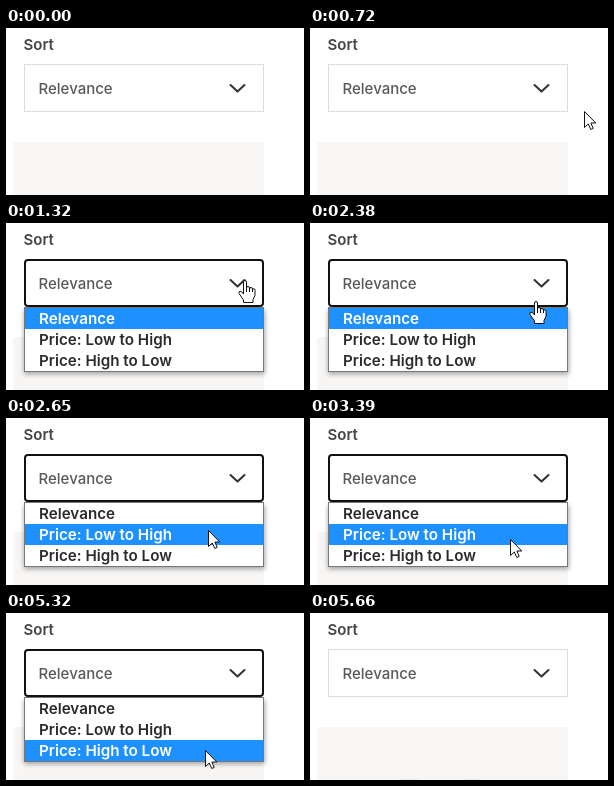
An HTML page that plays this animation: 298x167 px, repeating every 5790 ms.

```html
<!DOCTYPE html>
<html lang="en">
<head>
<meta charset="utf-8">
<title>Sort menu</title>
<style>
  html, body { margin: 0; width: 100%; height: 100%; overflow: hidden; background: #fff; }
  svg { display: block; width: 100vw; height: 100vh; }
  text { font: 500 15px Inter, Roboto, sans-serif; fill: #595959; }
  .label { font-weight: 600; fill: #444; }
  #list text { font-weight: 600; font-size: 15.2px; fill: #2a2a2a; }
  #list .on text { fill: #fff; }
  #list rect.row { fill: none; }
  #list .on rect.row { fill: #1e90ff; }
  .cursor { fill: #fff; stroke: #111; stroke-linejoin: round; }
</style>
</head>
<body>
<svg viewBox="0 0 298 167">
  <defs>
    <filter id="soft" x="-10%" y="-20%" width="120%" height="150%">
      <feGaussianBlur stdDeviation="2.5"/>
    </filter>
  </defs>
  <path d="M7 167V117q0-3 3-3H258V167Z" fill="#f7f6f5"/>
  <path id="hint" d="M92 166.5h18M152 166.5h20" stroke="#e9e9e8"/>
  <text class="label" x="17.5" y="22">Sort</text>
  <rect id="box" fill="#fff"/>
  <text x="32.5" y="66">Relevance</text>
  <path d="M224.5 57l7 6.5 7-6.5" fill="none" stroke="#333" stroke-width="2.1" stroke-linecap="round" stroke-linejoin="round"/>
  <g id="list">
    <rect x="18" y="87" width="241" height="64" fill="#000" opacity=".35" filter="url(#soft)"/>
    <rect x="18.5" y="84.5" width="239" height="64" fill="#fff" stroke="#777"/>
  </g>
  <path id="arrow" class="cursor" d="M.5 .5V16.5L4.3 13 6.8 18.5 9.2 17.4 6.9 12H11.8Z"/>
  <g id="hand" class="cursor">
    <path d="M-1.5 14V2Q-1.5 .5 0 .5T1.5 2V8Q1.5 6.5 3 6.5T4.5 8V9Q4.5 7.5 6 7.5T7.5 9V10Q7.5 8.8 8.8 8.8T10 10.3V15.5L8 19.5V22.5H-1.5V20L-6 13.5Q-6.5 11.5-5 11.2-3.5 11-1.5 14Z"/>
    <path d="M1.5 8v4M4.5 9v3M7.5 10v2" fill="none"/>
  </g>
</svg>
<script>
const LOOP = 5790, FOCUS = 1250, OPEN = 1320, CLOSE = 5660;
const ROW_TOP = 85, ROW_H = 21;
const $ = id => document.getElementById(id);

// start, end, steps, then three points of a quadratic curve
const moves = [
  [460, 920, 7, [296, 162], [290, 71], [239, 57]],
  [2310, 2720, 6, [237, 60], [201, 120], [201, 111]],
  [3320, 3590, 4, [201, 114], [200, 128], [194, 137]],
  [5320, 5520, 3, [199, 137], [206, 146], [266, 180]]
];

function make(parent, tag, attrs) {
  const el = document.createElementNS("http://www.w3.org/2000/svg", tag);
  set(el, attrs);
  return parent.appendChild(el);
}

function set(el, attrs) {
  for (const key in attrs) el.setAttribute(key, attrs[key]);
}

function show(el, on) {
  el.style.display = on ? "" : "none";
}

const rows = ["Relevance", "Price: Low to High", "Price: High to Low"].map((label, i) => {
  const g = make($("list"), "g", {});
  const y = ROW_TOP + i * ROW_H;
  make(g, "rect", { class: "row", x: 19, y, width: 238, height: ROW_H });
  make(g, "text", { x: 33, y: y + 15.5 }).textContent = label;
  return g;
});

function pointer(t) {
  const move = moves.filter(m => t >= m[0]).pop();
  if (!move) return null;
  const [start, end, steps, a, b, c] = move;
  const u = Math.min(1, Math.floor((t - start) / (end - start) * steps + .1) / steps);
  const v = 1 - u;
  return a.map((p, i) => Math.round(v * v * p + 2 * u * v * b[i] + u * u * c[i]));
}

function draw(t) {
  const focus = t >= FOCUS && t < CLOSE;
  const open = t >= OPEN && t < CLOSE;
  const pos = t < CLOSE ? pointer(t) : null;
  const [x, y] = pos || [0, 0];
  const over = x > 18 && x < 258 && y > 36 && y < 84;

  set($("box"), focus
    ? { x: 19, y: 37, width: 238, height: 46, rx: 3, stroke: "#111", "stroke-width": 2 }
    : { x: 18.5, y: 36.5, width: 239, height: 47, rx: 0, stroke: "#ddd", "stroke-width": 1 });
  show($("hint"), t >= CLOSE);
  show($("list"), open);
  const active = Math.max(0, Math.min(2, Math.floor((y - ROW_TOP) / ROW_H)));
  rows.forEach((row, i) => row.classList.toggle("on", i === active));

  show($("arrow"), pos && !over);
  show($("hand"), pos && over);
  set($(over ? "hand" : "arrow"), { transform: `translate(${x} ${y})` });
}

const began = performance.now();
function tick() {
  draw((performance.now() - began) % LOOP);
  requestAnimationFrame(tick);
}
tick();
</script>
</body>
</html>
```
